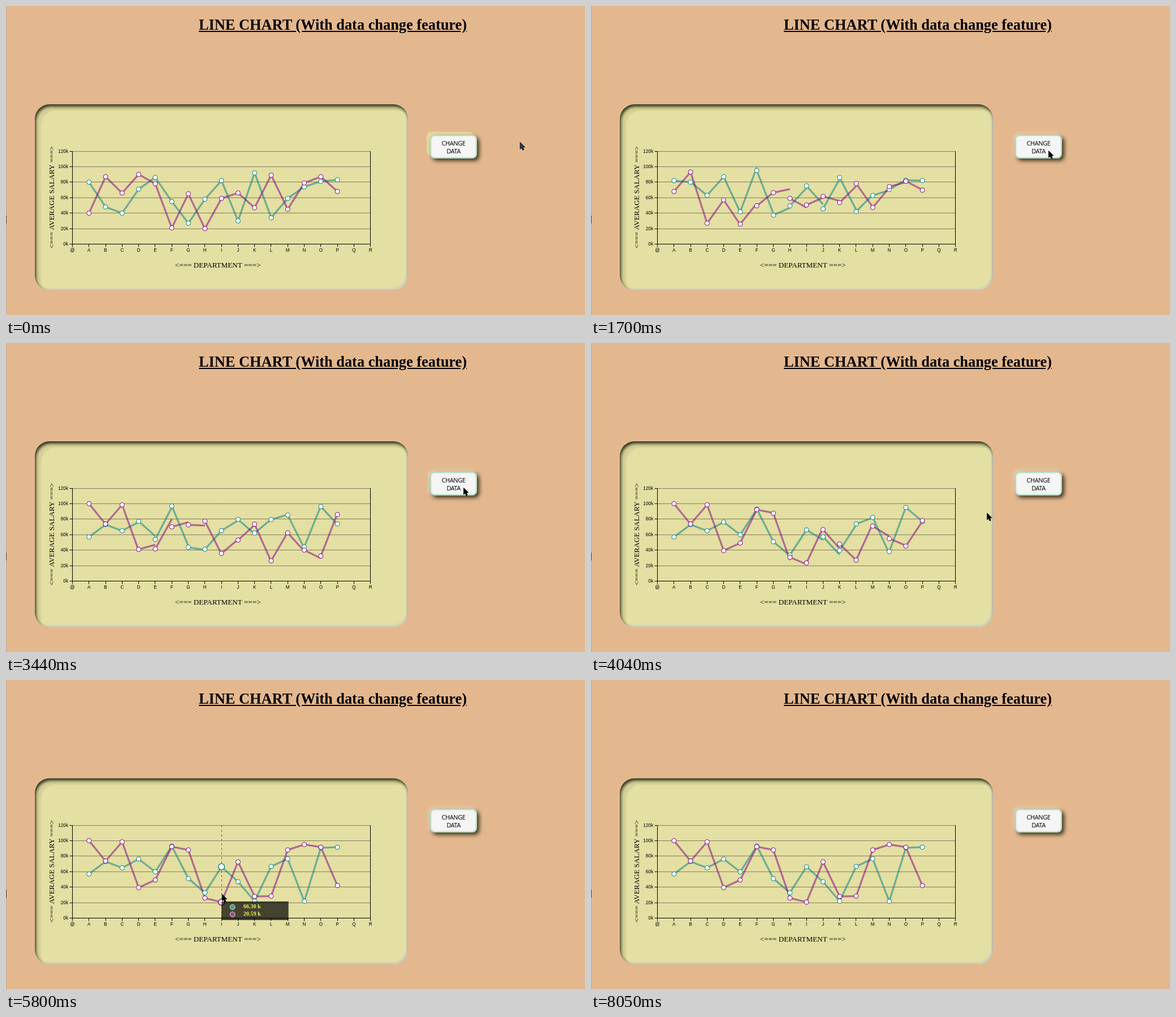
Recreate the animation shown at these times as an HTML page with a canvas. Size 1024 by 547 pixels, loop 8.63 s.

```html
<!DOCTYPE html>
<html lang="en">
<head>
<meta charset="utf-8">
<title>Line chart</title>
<style>
  html, body { margin: 0; width: 100%; height: 100%; overflow: hidden; background: #e4b88e; }
  body { position: relative; }
  body > * { position: absolute; box-sizing: border-box; margin: 0; }
  #edge { left: 0; top: 0; width: 1px; height: 547px; background: #bda78f; }
  #mark { left: 0; top: 371px; width: 1px; height: 14px; background: #4a4038; }
  h1 {
    left: 341px; top: 19px; white-space: nowrap; color: #000;
    font: bold 26.35px/30px "Liberation Serif", serif;
    text-decoration: underline;
  }
  #panel {
    left: 51px; top: 174px; width: 660px; height: 329px; border-radius: 26px;
    background: #e4dfa2;
    box-shadow: inset 2px 4px 5px rgba(20, 26, 10, .85),
      inset 11px 11px 2px rgba(110, 105, 60, .12),
      inset -3px -3px 3px #cdd0bc;
  }
  #button {
    left: 750px; top: 228px; width: 83px; height: 42px; border-radius: 8px;
    padding-top: 6px; background: #f5f5f5; border: 2px solid #b5dcc0; color: #000;
    text-align: center; font: 11px/14px "Open Sans", sans-serif; letter-spacing: -.4px;
    box-shadow: inset 0 0 3px #cdeed8, 4px 4px 7px rgba(35, 32, 15, .85),
      -2px -2px 6px rgba(235, 238, 230, .6);
  }
  #button.idle {
    box-shadow: inset 0 0 3px #cdeed8, 4px 4px 7px rgba(35, 32, 15, .85),
      -6px -5px 1px #e5d9a0;
  }
  canvas { left: 0; top: 0; }
</style>
</head>
<body>
<div id="edge"></div>
<div id="mark"></div>
<h1>LINE CHART (With data change feature)</h1>
<div id="panel"></div>
<div id="button">CHANGE<br>DATA</div>
<canvas id="stage" width="1024" height="547"></canvas>
<script>
const ctx = document.getElementById('stage').getContext('2d');
const button = document.getElementById('button');

const LOOP = 8630;
const LEFT = 117.5, RIGHT = 644.7, TOP = 257, BASE = 421.5;
const STEP = (RIGHT - LEFT) / 18;
const UNIT = (BASE - TOP) / 120;
const COUNT = 16;
const CLICKS = [864, 2869];
const POINT_MS = 200;
const NAMES = [...'@ABCDEFGHIJKLMNOPQR'];

// Salaries in thousands, A to P: at the start, after click one, after click two.
const SERIES = [
  { color: '#008080', chip: '#3f9d88', sets: [
    [80, 48, 40, 71, 86, 55, 27, 58, 82, 30, 92, 34, 59, 74, 81, 83],
    [82, 80, 63, 87, 41, 100, 41, 43, 65, 83, 65, 81, 87, 42, 99, 71],
    [57, 73, 65, 76.2, 59.8, 93, 51, 32.8, 66.3, 47, 21.9, 66.7, 76.6, 21.67, 90.8, 91.6]] },
  { color: '#800080', chip: '#a0428a', sets: [
    [40, 87, 66, 90, 78, 21, 65, 20, 59, 66, 47, 89, 45, 79, 87, 68],
    [68, 93, 27, 57, 25, 53, 67, 89, 38, 51, 77, 25, 62, 34, 21, 92],
    [100, 73.7, 98.5, 39.4, 49.2, 92.3, 88, 25.9, 20.59, 72.6, 28, 28.4, 88, 95.06, 91.6, 42]] }
];

// Pointer path: time, x, y.
const PATH = [
  [0, 909, 241], [610, 809, 256], [3800, 809, 256], [4280, 592, 345], [4700, 514, 360],
  [5800, 382, 379], [6240, 338, 386], [6570, 430, 395], [7060, 400, 404],
  [7210, 362, 507], [7360, 630, 429], [7770, 757, 416]
];

const mix = (a, b, p) => a + (b - a) * p;
const xAt = i => LEFT + i * STEP;
const yAt = value => BASE - value * UNIT;

function ease(t) {
  t = Math.min(1, Math.max(0, t));
  return t < .5 ? 4 * t ** 3 : 1 - 4 * (1 - t) ** 3;
}

// Height of a point when it moves at the pace of department `pace`.
// The second click takes over from wherever the first move has got to.
function heightAt(sets, point, pace, t) {
  const [a, b, c] = sets.map(set => yAt(set[point - 1]));
  const progress = (now, click) => ease((now - click) / (POINT_MS * pace));
  const first = mix(a, b, progress(Math.min(t, CLICKS[1]), CLICKS[0]));
  return mix(first, c, progress(t, CLICKS[1]));
}

function pointerAt(t) {
  const n = PATH.findIndex(key => key[0] > t);
  if (n < 0) return null;
  const [t0, x0, y0] = PATH[n - 1], [t1, x1, y1] = PATH[n];
  const p = (t - t0) / (t1 - t0);
  return { x: mix(x0, x1, p), y: mix(y0, y1, p) };
}

// Department under the pointer, or 0 when it is off the plot.
function hoverAt(pointer) {
  if (!pointer) return 0;
  const { x, y } = pointer;
  const i = Math.round((x - LEFT) / STEP);
  return y > TOP && y < BASE && i >= 1 && i <= COUNT ? i : 0;
}

function line(x1, y1, x2, y2, color, width = 1) {
  ctx.strokeStyle = color;
  ctx.lineWidth = width;
  ctx.beginPath();
  ctx.moveTo(x1, y1);
  ctx.lineTo(x2, y2);
  ctx.stroke();
}

function circle(x, y, r, fill, stroke, width = 1) {
  ctx.beginPath();
  ctx.arc(x, y, r, 0, Math.PI * 2);
  ctx.fillStyle = fill;
  ctx.fill();
  ctx.strokeStyle = stroke;
  ctx.lineWidth = width;
  ctx.stroke();
}

function text(s, x, y, font, align = 'center', color = '#000') {
  ctx.font = font;
  ctx.textAlign = align;
  ctx.fillStyle = color;
  ctx.fillText(s, x, y);
}

function drawAxes() {
  const small = '8.2px "Liberation Sans", sans-serif';
  const serif = '13.1px "Liberation Serif", serif';
  for (let k = 0; k <= 120; k += 20) {
    const y = Math.round(yAt(k) - .5) + .5;
    if (k) line(LEFT, y, RIGHT, y, '#837c5f');
    line(112.5, y, LEFT, y, '#000');
    text(k + 'k', 110, y + 2.7, small, 'right');
  }
  line(LEFT, TOP, LEFT, BASE, '#000');
  line(644.5, TOP, 644.5, BASE, '#000');
  line(LEFT, BASE, RIGHT, BASE, '#000');
  NAMES.forEach((name, i) => {
    const x = Math.floor(xAt(i)) + .5;
    line(x, BASE, x, BASE + 5, '#000');
    text(name, xAt(i), 434.7, small);
  });
  text('<=== DEPARTMENT ===>', 374.7, 463, serif);
  ctx.save();
  ctx.translate(84.8, 338.5);
  ctx.rotate(-Math.PI / 2);
  text('<=== AVERAGE SALARY ===>', 0, 0, serif);
  ctx.restore();
}

function drawSeries(t, hover) {
  // Both ends of a segment keep the pace of its left point.
  ctx.globalAlpha = .53;
  for (const { color, sets } of SERIES)
    for (let i = 1; i < COUNT; i++)
      line(xAt(i), heightAt(sets, i, i, t), xAt(i + 1), heightAt(sets, i + 1, i, t), color, 3.2);
  ctx.globalAlpha = 1;
  if (hover) {
    const x = Math.floor(xAt(hover)) + .5;
    ctx.setLineDash([4, 4]);
    line(x, TOP, x, BASE, '#ad4c32');
    ctx.setLineDash([]);
  }
  for (const { color, sets } of SERIES)
    for (let i = 1; i <= COUNT; i++) {
      const big = i === hover;
      circle(xAt(i), heightAt(sets, i, i, t), big ? 5.5 : 4, '#fff', color, big ? 1.4 : 1);
    }
}

function drawTooltip(i) {
  const values = SERIES.map(series => series.sets[2][i - 1]);
  const x = xAt(i), y = Math.floor(yAt(values[1])) - 1;
  ctx.fillStyle = 'rgba(0, 0, 0, .7)';
  ctx.fillRect(x, y, 118.5, 33);
  values.forEach((value, n) => {
    const row = y + 10 + n * 13;
    circle(x + 19.5, row, 4.4, SERIES[n].chip, '#e8e8e0');
    text(value.toFixed(2) + ' k', x + 39, row + 1.8,
      'bold 10px "Liberation Serif", serif', 'left', '#f4ee4e');
  });
}

function drawPointer({ x, y }, fill) {
  ctx.beginPath();
  [[.5, .5], [.5, 12], [3, 9.8], [5, 14], [7, 13.2], [5.2, 9], [8.7, 8.8]]
    .forEach(([dx, dy]) => ctx.lineTo(x + dx, y + dy));
  ctx.closePath();
  ctx.fillStyle = fill;
  ctx.fill();
  ctx.strokeStyle = '#000';
  ctx.lineWidth = 1;
  ctx.stroke();
}

function draw(t) {
  const pointer = pointerAt(t);
  const hover = hoverAt(pointer);
  const idle = t < CLICKS[0];

  ctx.clearRect(0, 0, 1024, 547);
  button.className = idle ? 'idle' : '';
  drawAxes();
  drawSeries(t, hover);
  if (hover) drawTooltip(hover);
  if (pointer) drawPointer(pointer, idle ? '#24466a' : '#000');
}

const start = performance.now();
function loop() {
  draw((performance.now() - start) % LOOP);
  requestAnimationFrame(loop);
}
loop();
</script>
</body>
</html>
```
